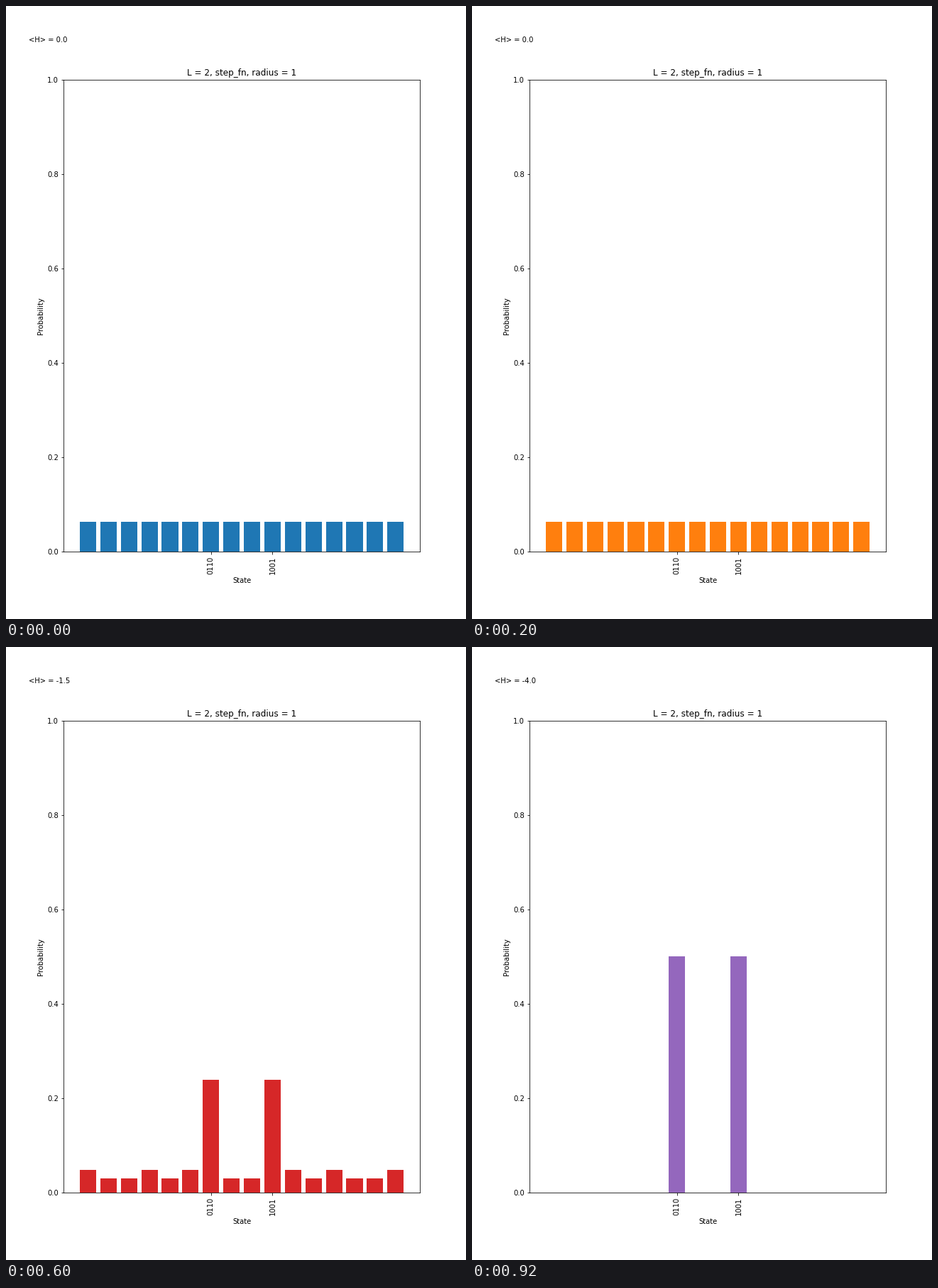
A matplotlib script that plays this animation: 648x864 px, repeating every 1000 ms.

```python
import matplotlib.pyplot as plt
from matplotlib.animation import FuncAnimation

N_STATES = 16
PEAKS = (6, 9)  # 0110 and 1001

# (energy, P(peak), P(other even parity), P(odd parity))
UNIFORM = (0.0, 1 / 16, 1 / 16, 1 / 16)
PARTIAL = (-1.5, 0.239, 0.0476, 0.0295)
GROUND = (-4.0, 0.5, 0.0, 0.0)
STEPS = [UNIFORM, UNIFORM, PARTIAL, PARTIAL, GROUND]


def probability(state, peak, even, odd):
    if state in PEAKS:
        return peak
    return odd if bin(state).count("1") % 2 else even


fig, ax = plt.subplots(figsize=(9, 12), dpi=72)
bars = ax.bar(range(N_STATES), [STEPS[0][1]] * N_STATES)
energy_text = fig.text(0.05, 0.95, "", va="top")

ax.set_title("L = 2, step_fn, radius = 1")
ax.set_xlabel("State")
ax.set_ylabel("Probability")
ax.set_xlim(-1.19, 16.19)
ax.set_ylim(0, 1)
ax.set_xticks(PEAKS, [f"{state:04b}" for state in PEAKS], rotation=90)


def update(step):
    energy, *levels = STEPS[step]
    energy_text.set_text(f"<H> = {energy}")
    for state, bar in enumerate(bars):
        bar.set_height(probability(state, *levels))
        bar.set_color(f"C{step}")
        bar.set_linewidth(0)
    return [*bars, energy_text]


anim = FuncAnimation(fig, update, frames=len(STEPS), interval=200,
                     repeat=True, repeat_delay=0)
plt.show()
```
